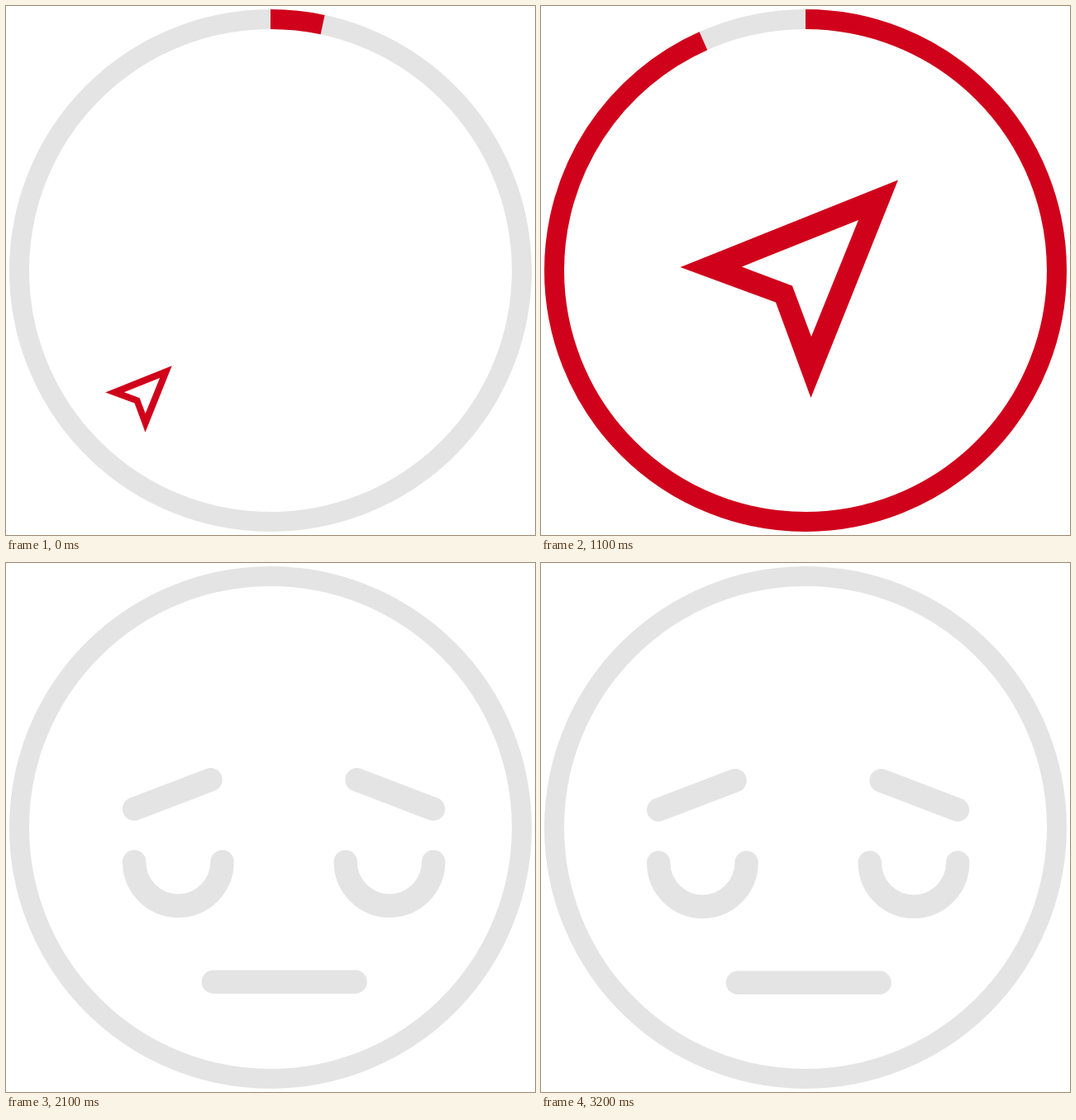
Recreate the animation shown at these times as an HTML page. Size 640 by 640 pixels, loop 3.6 s.

```html
<!DOCTYPE html>
<html lang="en">
<head>
<meta charset="utf-8">
<title>Progress and sad face</title>
<style>
  html, body { margin: 0; height: 100%; overflow: hidden; background: #fff; }
  svg { display: block; width: 100vw; height: 100vh; }
</style>
</head>
<body>
<svg viewBox="0 0 640 640">
  <g fill="none" stroke-width="24">
    <circle cx="320" cy="320" r="304" stroke="#e4e4e4"/>
    <circle id="progress" cx="320" cy="320" r="304" stroke="#d0021b"
            pathLength="30" transform="rotate(-90 320 320)"/>
  </g>
  <path id="arrow" fill="#d0021b" fill-rule="evenodd"
        d="M432 210.5 168.5 316 284 358.5 326.5 474Z M384 259 243 315.5 304 338.5 327 400Z"/>
  <g id="face" fill="none" stroke="#e4e4e4" stroke-width="28.4" stroke-linecap="round">
    <path d="M142.2 298.6 234.6 263.2M411.6 263.2 504 298.6M238 507.8H409.7"/>
    <path d="M142.2 362.5a53.2 53.2 0 0 0 106.4 0M397.8 362.5a53.2 53.2 0 0 0 106.4 0"/>
  </g>
</svg>
<script>
const [progress, arrow, face] = ['progress', 'arrow', 'face'].map(id => document.getElementById(id));

// Eased value at time t between [time, value] keys
function tween(t, keys) {
  if (t <= keys[0][0]) return keys[0][1];
  for (let i = 1; i < keys.length; i++) {
    const [t0, v0] = keys[i - 1], [t1, v1] = keys[i];
    if (t < t1) {
      const u = (t - t0) / (t1 - t0);
      return v0 + (v1 - v0) * u * u * (3 - 2 * u);
    }
  }
  return keys[keys.length - 1][1];
}

// Scale an element about (cx, cy), then shift it
function place(el, cx, cy, scale, dx, dy) {
  el.setAttribute('display', scale > 0.001 ? 'inline' : 'none');
  el.setAttribute('transform',
    `translate(${cx + dx} ${cy + dy}) scale(${scale}) translate(${-cx} ${-cy})`);
}

function draw(now) {
  // Ten pictures a second on a 25-ticks-a-second timeline, with a hold at the end
  const step = Math.min(32, Math.floor(now % 3600 / 100));
  const t = 1 + Math.floor(step * 2.5);

  progress.setAttribute('display', t < 30 ? 'inline' : 'none');
  progress.setAttribute('stroke-dasharray', `${t} 60`);

  const away = Math.max(0, 1 - t / 6) ** 2;
  const arrowScale = (1 - away) * tween(t, [[30.26, 1], [37.2, 0]]);
  place(arrow, 320, 320, arrowScale, -221 * away, 214 * away);

  place(face, 323, 385.5,
    tween(t, [[37, 0], [44, 1.005], [51, 1]]),
    tween(t, [[46, -3], [51, 0], [57, 50], [68, -62], [76, 28], [81, 0]]),
    tween(t, [[38, 34], [51, -1], [57, -1], [62, 0]]));

  requestAnimationFrame(() => draw(performance.now() - start));
}

const start = performance.now();
draw(0);
</script>
</body>
</html>
```
